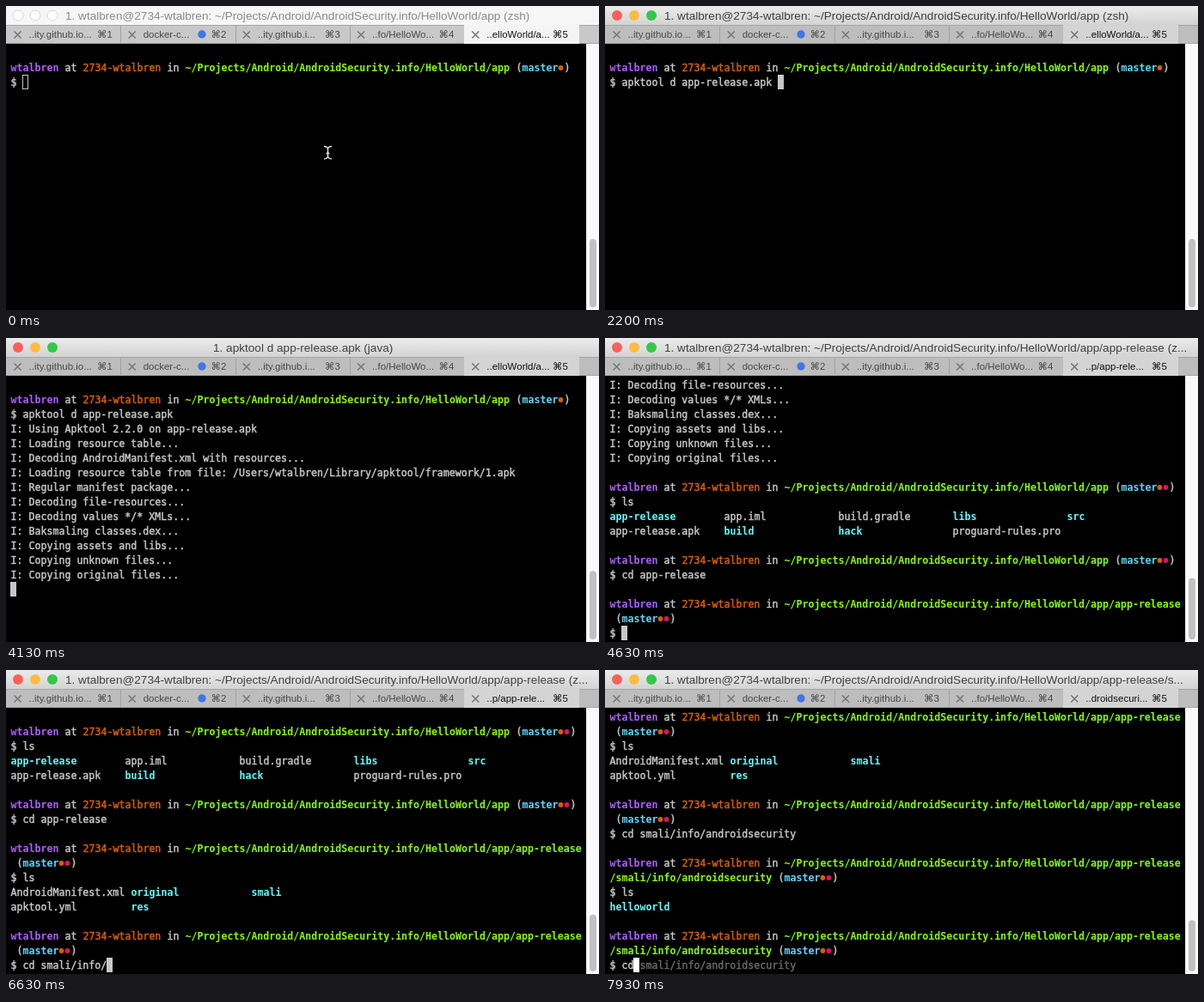
Recreate the animation shown at these times as an HTML page. Size 690 px wide and 354 px high, loop 8000 ms.

```html
<!DOCTYPE html>
<html lang="en">
<head>
<meta charset="utf-8">
<title>Terminal session</title>
<style>
  html, body { margin: 0; width: 100%; height: 100%; overflow: hidden; background: #000; }
  svg { display: block; width: 690px; height: 354px; }
  text { white-space: pre; }
  .term { font: 11.627px "DejaVu Sans Mono", monospace; }
  .medium { stroke-width: .45px; }
  .bold { font-weight: bold; stroke: none; }
  .ui { font: 13.6px "Liberation Sans", Arial, sans-serif; }
  .tab { font: 11.5px "Liberation Sans", "DejaVu Sans", sans-serif; }
</style>
</head>
<body>
<svg id="stage" viewBox="0 0 690 354" width="690" height="354">
  <defs>
    <linearGradient id="bar" x2="0" y2="1">
      <stop stop-color="#ebebeb"/><stop offset="1" stop-color="#d2d2d2"/>
    </linearGradient>
  </defs>
  <rect width="690" height="354" fill="#000"/>
  <g id="chrome"></g>
  <g id="screen" class="term"></g>
  <rect x="675" y="44" width="15" height="310" fill="#fafafa"/>
  <path d="M675.5 44V354" stroke="#e6e6e6"/>
  <rect id="thumb" x="679" width="8" rx="4" fill="#c1c1c1"/>
  <path id="mouse" d="M370 163.500q4 0 4.500 3q.5-3 4.500-3M370 178q4 0 4.500-3q.5 3 4.500 3M374.500 166v9M372.500 171.500h4"
        fill="none" stroke="#e8e8e8" stroke-width="1.400"/>
</svg>
<script>
const LOOP = 8000, ROWS = 18, CELL_W = 7, CELL_H = 17, LEFT = 5, TOP = 46;
const GREY = '#c7c7c7', PURPLE = '#af5fff', ORANGE = '#d75f00', GREEN = '#87ff00',
      BLUE = '#5fd7ff', PINK = '#e0115f', CYAN = '#60fdff', DIM = '#686868';
const USER = 'wtalbren', HOST = '2734-wtalbren';
const APP = '~/Projects/Android/AndroidSecurity.info/HelloWorld/app';
const RELEASE = APP + '/app-release';
const titleFor = rest => `1. ${USER}@${HOST}: ${rest}`;

const $ = id => document.getElementById(id);
function add(parent, tag, attrs, content) {
  const node = document.createElementNS('http://www.w3.org/2000/svg', tag);
  for (const key in attrs) node.setAttribute(key, attrs[key]);
  if (content !== undefined) node.textContent = content;
  parent.appendChild(node);
}

// A line is a list of segments: [text, colour, bold, column].
const plain = text => [[text, GREY]];
const dir = (text, col) => [text, CYAN, true, col];
const file = (text, col) => [text, GREY, false, col];

const branch = dots => [
  [' (', GREY], ['master', BLUE, true],
  ...[ORANGE, PINK].slice(0, dots).map(c => ['●', c]), [')', GREY]
];
function prompt(path, dots, tail) {
  const head = [[USER, PURPLE, true], [' at ', GREY], [HOST, ORANGE], [' in ', GREY], [path, GREEN, true]];
  if (tail === undefined) return [[...head, ...branch(dots)]];
  return [head, [[tail, GREEN, true], ...branch(dots)]];
}

// Actions on the session state
const type = (input, ghost = '') => s => Object.assign(s, { input, ghost, waiting: false });
const suggest = (full, count) => type(full.slice(0, count), full.slice(count));
const run = s => {
  s.lines.push(plain('$ ' + s.input));
  Object.assign(s, { input: '', ghost: '', ready: false });
};
const output = (...lines) => s => s.lines.push(...lines);
const print = (...texts) => output(...texts.map(t => plain('I: ' + t)));
const ready = (...args) => s => { s.lines.push([], ...prompt(...args)); s.ready = true; };
const set = values => s => Object.assign(s, values);

const DECODE = 'apktool d app-release.apk';
const ENTER = 'cd smali/info/androidsecurity';

const events = [
  [30, set({ active: true })],
  [360, set({ mouse: false })],
  [360, suggest(DECODE, 1)], [460, suggest(DECODE, 2)], [560, suggest(DECODE, 3)],
  [730, suggest(DECODE, 4)], [800, suggest(DECODE, 5)], [860, suggest(DECODE, 7)],
  [960, suggest(DECODE, 8)], [1160, suggest(DECODE, 9)], [1230, type(DECODE)],
  [1530, set({ waiting: true })], [2200, type(DECODE + ' ')],
  [2930, run], [2930, set({ title: '1. apktool d app-release.apk (java)', titleX: 241 })],
  [2960, print('Using Apktool 2.2.0 on app-release.apk')],
  [3000, print('Loading resource table...')],
  [3030, print('Decoding AndroidManifest.xml with resources...')],
  [3100, print(`Loading resource table from file: /Users/${USER}/Library/apktool/framework/1.apk`)],
  [3500, print('Regular manifest package...', 'Decoding file-resources...')],
  [3660, print('Decoding values */* XMLs...')],
  [3700, print('Baksmaling classes.dex...')],
  [3930, print('Copying assets and libs...', 'Copying unknown files...', 'Copying original files...')],
  [4200, ready(APP, 2)], [4200, set({ title: titleFor(APP + ' (zsh)'), titleX: 69 })],
  [4400, type('l')], [4430, type('ls')],
  [4460, run],
  [4460, output(
    [dir('app-release', 0), file('app.iml', 19), file('build.gradle', 38), dir('libs', 57), dir('src', 76)],
    [file('app-release.apk', 0), dir('build', 19), dir('hack', 38), file('proguard-rules.pro', 57)])],
  [4460, ready(APP, 2)],
  [4530, type('cd')], [4560, type('cd app-release')],
  [4630, run], [4630, ready(RELEASE, 2, '')],
  [4630, set({ title: titleFor(RELEASE + ' (z...'), tab: '..p/app-rele...' })],
  [5230, type('l', 's')], [5300, type('ls')],
  [5430, run],
  [5430, output(
    [file('AndroidManifest.xml', 0), dir('original', 20), dir('smali', 40)],
    [file('apktool.yml', 0), dir('res', 20)])],
  [5430, ready(RELEASE, 2, '')],
  [5560, suggest('cd app-release', 1)], [5660, suggest('cd app-release', 2)],
  [5800, suggest('cd app-release', 3)],
  [6230, type('cd s')], [6330, type('cd smali')],
  [6560, type('cd smali/')], [6600, type('cd smali/info/')],
  [6660, type('cd smali/info/a')], [6730, type(ENTER + '/')],
  [6930, type(ENTER)], [6960, run],
  [7030, ready(RELEASE, 2, '/smali/info/androidsecurity')],
  [7030, set({ title: titleFor(RELEASE + '/s...'), tab: '..droidsecuri...' })],
  [7630, type('l', 's')], [7700, type('ls')],
  [7760, run], [7760, output([dir('helloworld', 0)])],
  [7760, ready(RELEASE, 2, '/smali/info/androidsecurity')],
  [7860, suggest(ENTER, 1)],
  [7930, suggest(ENTER, 2)], [7930, set({ cursor: '#fff' })]
];

function stateAfter(count) {
  const state = {
    lines: [[], ...prompt(APP, 1)], input: '', ghost: '', ready: true, waiting: false,
    active: false, mouse: true, cursor: GREY,
    title: titleFor(APP + ' (zsh)'), titleX: 69, tab: '..elloWorld/a...'
  };
  events.slice(0, count).forEach(([, act]) => act(state));
  return state;
}

function drawChrome(s) {
  const g = $('chrome');
  g.replaceChildren();
  add(g, 'rect', { width: 690, height: 23, fill: s.active ? 'url(#bar)' : '#f6f6f6' });
  ['#fc605b', '#fdbc40', '#34c749'].forEach((color, i) => add(g, 'circle', {
    cx: 14 + i * 20, cy: 11, r: 6,
    fill: s.active ? color : '#fdfdfd', stroke: s.active ? 'none' : '#d8d8d8'
  }));
  add(g, 'text', { class: 'ui', x: s.titleX, y: 16, fill: s.active ? '#404040' : '#8a8a8a' }, s.title);

  add(g, 'rect', { y: 22, width: 690, height: 22, fill: s.active ? '#bdbdbd' : '#c8c8c8' });
  add(g, 'path', { d: 'M0 22.500H690M0 43.500H690', stroke: '#a6a6a6' });
  for (let i = 1; i < 5; i++) add(g, 'path', { d: `M${Math.round(i * 133.3) + 0.5} 23V43`, stroke: '#a2a2a2' });
  add(g, 'rect', { x: 533, y: 22, width: 134, height: 22, fill: s.active ? '#d4d4d4' : '#f4f4f4' });

  const names = ['..ity.github.io...', 'docker-c...', '..ity.github.i...', '..fo/HelloWo...', s.tab];
  names.forEach((name, i) => {
    const x = i * 133.2, ink = i === 4 ? '#111' : '#484848';
    add(g, 'path', { d: `M${x + 9.5} 29.500l8 8m0-8l-8 8`, stroke: '#777', 'stroke-width': 1.6 });
    add(g, 'text', { class: 'tab', x: x + 26.5, y: 37, fill: ink }, name);
    add(g, 'text', { class: 'tab', x: 106 + i * 132.5, y: 37, fill: ink }, '⌘' + (i + 1));
  });
  add(g, 'circle', { cx: 228, cy: 33, r: 4.7, fill: '#3f76e6' });
}

function drawLine(g, segments, top) {
  let col = 0;
  for (const [text, fill, bold, at = col] of segments) {
    const x = LEFT + at * CELL_W;
    if (text === '●') add(g, 'circle', { cx: x + 3.5, cy: top + 9, r: 2.9, fill });
    else if (text) add(g, 'text', {
      x: x + 0.5, y: top + 13, fill, stroke: fill, class: bold ? 'bold' : 'medium'
    }, text);
    col = at + text.length;
  }
}

function drawCursor(g, s, col, top) {
  const x = LEFT + col * CELL_W;
  add(g, 'rect', s.active
    ? { x, y: top, width: CELL_W, height: CELL_H, fill: s.cursor }
    : { x: x + 0.5, y: top + 0.5, width: CELL_W - 1, height: CELL_H - 1, fill: 'none', stroke: GREY });
}

function drawScreen(s) {
  const g = $('screen');
  g.replaceChildren();
  const scroll = Math.max(0, s.lines.length + 1 - ROWS);
  const topOf = row => TOP + (row - scroll) * CELL_H;
  s.lines.forEach((line, row) => row >= scroll && drawLine(g, line, topOf(row)));

  const row = s.lines.length, col = s.ready ? 2 + s.input.length : 0;
  if (s.waiting) drawCursor(g, s, 0, topOf(row + 1));
  else drawCursor(g, s, col, topOf(row));
  if (s.ready) drawLine(g, [['$ ' + s.input, GREY], [s.ghost, DIM]], topOf(row));

  const height = 306 * ROWS / (69 + scroll);
  $('thumb').setAttribute('y', 351 - height);
  $('thumb').setAttribute('height', height);
}

let shown = -1;
function render(time) {
  const count = events.filter(([at]) => at <= time).length;
  if (count === shown) return;
  shown = count;
  const state = stateAfter(count);
  drawChrome(state);
  drawScreen(state);
  $('mouse').setAttribute('visibility', state.mouse ? 'visible' : 'hidden');
}

const start = performance.now();
function tick() {
  render((performance.now() - start) % LOOP);
  requestAnimationFrame(tick);
}
tick();
</script>
</body>
</html>
```
